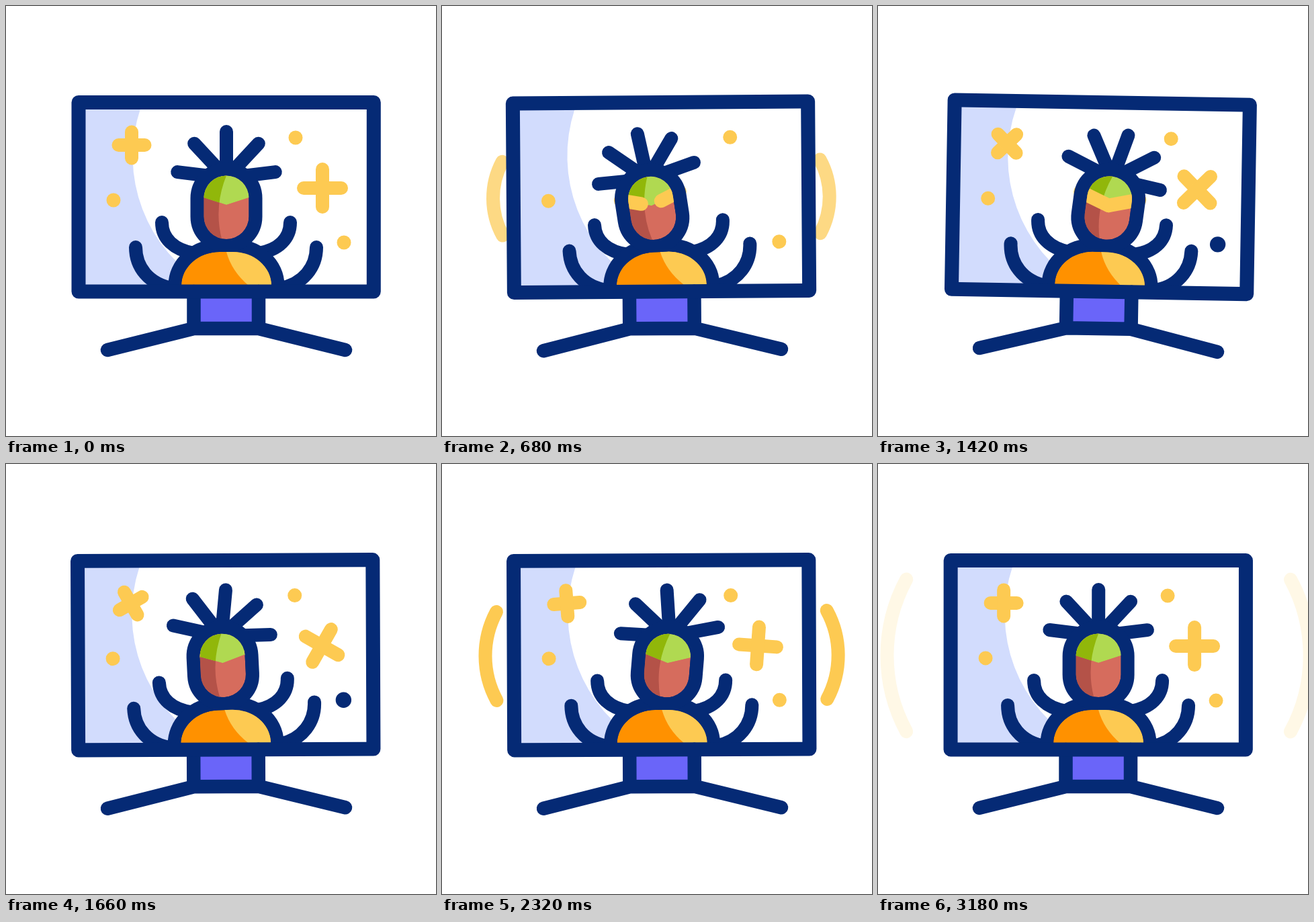
Animation, 640 px wide and 640 px high, one loop 3200 ms. Source, as an HTML page with a canvas:

```html
<!DOCTYPE html>
<html lang="en">
<head>
<meta charset="utf-8">
<title>Screen dancer</title>
<style>
html, body { margin: 0; width: 100%; height: 100%; overflow: hidden; background: #fff; }
canvas { display: block; width: 100vmin; height: 100vmin; }
</style>
</head>
<body>
<canvas width="640" height="640"></canvas>
<script>
const c = document.querySelector('canvas').getContext('2d');
const LOOP = 3200, RAD = Math.PI / 180, CX = 328;
const NAVY = '#052a75', GOLD = '#fdca52';

// [time, value] keys, eased in and out between neighbours
const TILT = [[0, 0], [250, -1.65], [1140, .95], [1420, .95], [1600, 0]];
const HEAD = [[0, 0], [720, -8.4], [1300, 8.4], [1900, -8.4], [2500, 8.4], [3200, 0]];
const HAIR = [[0, 0], [380, 8.5], [960, -15], [1500, 14], [2050, -15.5], [2780, 8], [3200, 0]];
const BODY_SWAY = [[0, 0], [420, -4.5], [1120, 3.9], [1880, -3.1], [2640, 1.8], [3200, 0]];
const WAVES = [112, 610, 2170, 2690];

const DOTS = [
  { x: 160, y: 289, dark: [[200, 500], [1780, 2080]] },
  { x: 431, y: 196, dark: [[820, 1120]] },
  { x: 503, y: 352, dark: [[1300, 2020], [2600, 2900]] }
];
const PLUSES = [
  { x: 187, y: 207, arm: 19.5, via: [187, 320], side: -1 },
  { x: 471, y: 271, arm: 28, via: [423, 400], side: 1 }
];

const HEAD_SHAPE = new Path2D('M294.5 286a33.5 33.5 0 0 1 67 0v27.5a33.5 33.5 0 0 1-67 0z');
const BODY = new Path2D('M261 440V416A57 50 0 0 1 318 366H338A57 50 0 0 1 395 416V440Z');
const SHINE = new Path2D('M328 360V366Q336 395 361 416L390 440H400V360Z');
const ARM_CURVES = new Path2D(
  'M232 322C232 346 250 363 280 368M193 359C193 388 212 414 248 420' +
  'M423 322C423 346 406 363 376 368M462 359C462 388 443 414 408 420');
const SHADE = new Path2D('M329 250Q308 300 322 350H280V250Z');
const CAP = new Path2D('M290 240V283.7L328 296L366 283.7V240Z');
const TINT = new Path2D('M118 153H200A222 222 0 0 0 300 416H118Z');
const STAND = new Path2D('M279.5 425V480H376V425M151 512L279.5 480H376L505 512');

const clamp = v => Math.max(0, Math.min(1, v));
const ramp = (t, a, b) => clamp((t - a) / (b - a));
const smooth = p => (1 - Math.cos(Math.PI * p)) / 2;
const ease = (t, a, b) => smooth(ramp(t, a, b));

function track(keys, t) {
  const i = Math.max(1, keys.findIndex(k => k[0] >= t));
  const [t0, a] = keys[i - 1], [t1, b] = keys[i];
  return a + (b - a) * ease(t, t0, t1);
}

function fill(path, color) { c.fillStyle = color; c.fill(path); }

function stroke(path, color, width) {
  c.strokeStyle = color;
  c.lineWidth = width;
  c.stroke(path);
}

function line(color, width, ...pts) {
  const p = new Path2D();
  pts.forEach(([x, y], i) => i ? p.lineTo(x, y) : p.moveTo(x, y));
  stroke(p, color, width);
}

function disc(x, y, r, color) {
  const p = new Path2D();
  p.arc(x, y, r, 0, 7);
  fill(p, color);
}

function group(draw) { c.save(); draw(); c.restore(); }

function turn(deg, x, y) {
  c.translate(x, y);
  c.rotate(deg * RAD);
  c.translate(-x, -y);
}

function drawWaves(t) {
  for (const start of WAVES) {
    const u = t - start;
    if (u < 0 || u > 540) continue;
    const h = 45 + .139 * u, d = 190 + 1.1 * h, r = 2.1 * h;
    const spread = Math.asin(h / r);
    c.globalAlpha = Math.min(clamp(u / 100), clamp((540 - u) / 345));
    for (const side of [-1, 1]) {
      const p = new Path2D(), mid = side < 0 ? Math.PI : 0;
      p.arc(CX + side * (d - r), 285, r, mid - spread, mid + spread);
      stroke(p, GOLD, 20);
    }
  }
  c.globalAlpha = 1;
}

function drawPlus(p, arm, scale, deg) {
  group(() => {
    c.translate(p.x, p.y);
    c.rotate(deg * RAD);
    c.scale(scale, scale);
    const a = Math.max(.01, p.arm * arm);
    line(GOLD, 20, [-a, 0], [a, 0]);
    line(GOLD, 20, [0, -a], [0, a]);
  });
}

function drawSparkles(t, head) {
  for (const d of DOTS) {
    const dark = d.dark.some(([a, b]) => t >= a && t < b);
    disc(d.x, d.y, dark ? 11.7 : 10.5, dark ? NAVY : GOLD);
  }
  const ang = head * RAD, fly = ease(t, 155, 550);
  for (const p of PLUSES) {
    if (t < 155) drawPlus(p, 1 - ease(t, 0, 155), 1, 0);
    else if (t < 1720) {
      // arc from the resting place to the side of the swaying head
      const ox = p.side * 44, oy = 281.5 - 395;
      const ex = CX + ox * Math.cos(ang) - oy * Math.sin(ang);
      const ey = 395 + ox * Math.sin(ang) + oy * Math.cos(ang);
      const q = 1 - fly;
      disc(q * q * p.x + 2 * q * fly * p.via[0] + fly * fly * ex,
        q * q * p.y + 2 * q * fly * p.via[1] + fly * fly * ey,
        10.5 * (1 - ramp(t, 1620, 1720)), GOLD);
    }
    if (t > 1060) {
      const left = 1 - ramp(t, 880, 2720);
      drawPlus(p, 1, ease(t, 1060, 1300), p.side * 90 * left * left);
    }
  }
}

function drawHead(t, head) {
  turn(head, CX, 395);
  group(() => {
    turn(track(HAIR, t), CX, 256);
    for (const deg of [-83, -43, 0, 43, 83]) {
      const len = 69 + (deg / 40) ** 2, a = deg * RAD;
      line(NAVY, 20, [CX, 256], [CX + len * Math.sin(a), 256 - len * Math.cos(a)]);
    }
  });
  stroke(HEAD_SHAPE, NAVY, 40);
  c.clip(HEAD_SHAPE);
  fill(HEAD_SHAPE, '#d66c5d');
  fill(SHADE, '#b45248');
  group(() => {
    c.clip(CAP);
    fill(CAP, '#b0d951');
    fill(SHADE, '#91b70a');
  });
  const k = ease(t, 560, 760) * (1 - ease(t, 1500, 1680));
  if (k > 0) {
    for (const s of [-1, 1]) {
      line(GOLD, 20.5, [CX + s * 44, 281.5], [CX + s * 44 * (1 - k), 281.5 + 14.5 * k]);
    }
  }
}

function drawScreen(t) {
  const head = track(HEAD, t), sway = track(BODY_SWAY, t);
  const view = new Path2D();
  view.rect(112, 148, 432, 274);
  c.clip(view);
  fill(view, '#fff');
  fill(TINT, '#d2dcfd');
  drawSparkles(t, head);
  group(() => {
    turn(sway, CX, 432);
    stroke(ARM_CURVES, NAVY, 20);
    stroke(BODY, NAVY, 39);
  });
  group(() => drawHead(t, head));
  turn(sway, CX, 432);
  c.clip(BODY);
  fill(BODY, '#ff9100');
  fill(SHINE, GOLD);
}

function draw(t) {
  c.fillStyle = '#fff';
  c.fillRect(0, 0, 640, 640);
  c.lineCap = c.lineJoin = 'round';
  group(() => {
    turn(track(TILT, t % 1600), CX, 512);
    drawWaves(t);
    group(() => drawScreen(t));
    c.fillStyle = '#6a65f9';
    c.fillRect(280, 425, 96, 55);
    stroke(STAND, NAVY, 20.5);
    c.lineWidth = 21;
    c.strokeRect(108, 143.5, 439.3, 281.5);
  });
}

function frame() {
  draw(performance.now() % LOOP);
  requestAnimationFrame(frame);
}
frame();
</script>
</body>
</html>
```
